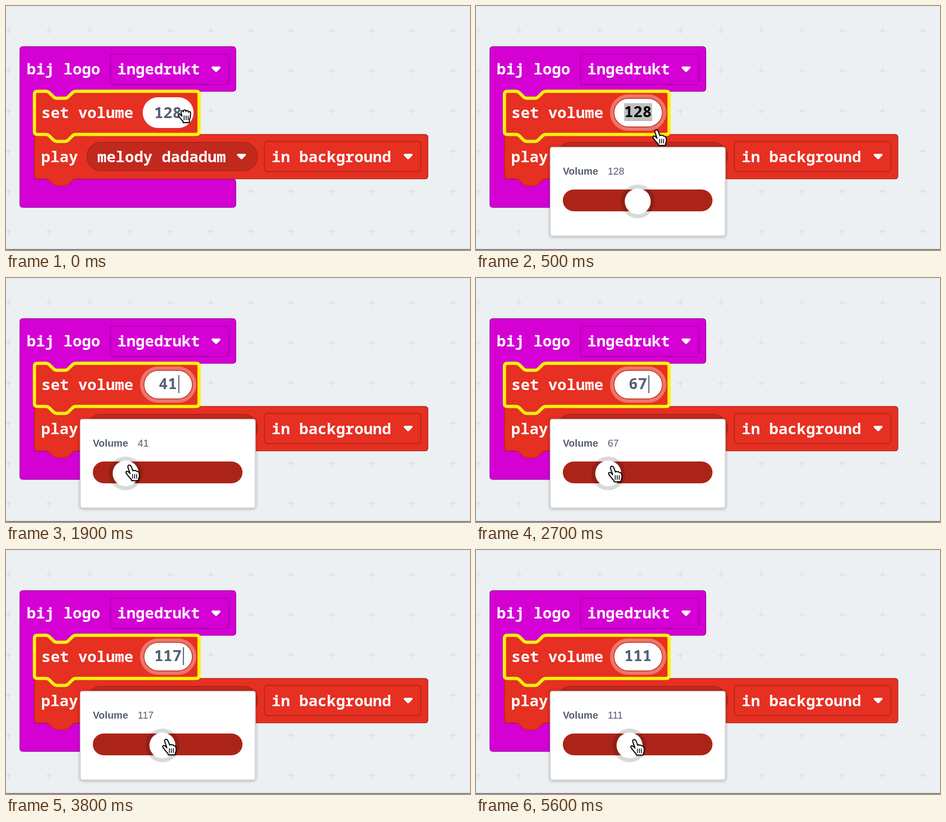
These frames come from a looping animation (930x492 px, 5970 ms). An HTML page:

```html
<!DOCTYPE html>
<html lang="nl">
<head>
<meta charset="utf-8">
<title>Volume slider</title>
<style>
html, body { margin: 0; width: 100%; height: 100%; overflow: hidden; background: #ecf0f2; }
svg { display: block; width: 930px; height: 492px; }
.mono { font: 600 30.7px "Noto Sans Mono", "DejaVu Sans Mono", monospace; fill: #fff; white-space: pre; }
.label { font: 20px "Liberation Sans", Arial, sans-serif; fill: #575e75; }
.title { font-weight: 700; }
.arrow { fill: #fff; stroke: #fff; stroke-width: 4; stroke-linejoin: round; }
.red { fill: #e63022; stroke: #b8261b; stroke-width: 1.7; }
.cursor { stroke: #000; stroke-width: 2; stroke-linejoin: round; stroke-linecap: round; fill: #fff;
  filter: drop-shadow(0 1px 1px rgba(0,0,0,.35)); }
#value { text-anchor: middle; }
#popup { filter: drop-shadow(0 1px 3px rgba(0,0,0,.3)); }
</style>
</head>
<body>
<svg viewBox="0 0 930 492">
  <path id="grid" stroke="#d9dde0" stroke-width="1.6"/>
  <rect y="490" width="930" height="2" fill="#7d7f80"/>

  <path id="event" fill="#d400d4" stroke="#a000a0" stroke-width="1.6"/>
  <rect x="209.500" y="97" width="237" height="61" rx="6" fill="none" stroke="#aa00aa" stroke-width="1.8"/>
  <text class="mono" x="41.500" y="138">bij logo</text>
  <text class="mono" x="223" y="138">ingedrukt</text>

  <path id="play" class="red"/>
  <rect x="162" y="275" width="342" height="57" rx="28.500" fill="#c2291d" stroke="#ae2419" stroke-width="1.8"/>
  <rect x="518" y="273" width="313.500" height="61" rx="6" fill="none" stroke="#b8261b" stroke-width="1.8"/>
  <text class="mono" x="70.500" y="315">play</text>
  <text class="mono" x="183" y="315">melody dadadum</text>
  <text class="mono" x="532.500" y="315">in background</text>
  <g class="arrow">
    <path d="M414 124h14l-7 7Z"/>
    <path d="M465 300h14l-7 7Z"/>
    <path d="M799 300h14l-7 7Z"/>
  </g>

  <path id="set" fill="#e63022" stroke="#fff20a" stroke-width="6.500" stroke-linejoin="round"/>
  <text class="mono" x="71" y="226">set volume</text>
  <rect id="ring" fill="#fff" fill-opacity=".33"/>
  <rect id="pill" fill="#fff" stroke="#b8261b"/>
  <rect id="mark" x="297" y="196" width="56" height="36" fill="#c0c0c0"/>
  <text id="value" class="mono" x="324.500"></text>
  <rect id="caret" y="196" width="2" height="36" fill="#4b5068"/>

  <g id="popup">
    <rect x="149" y="285" width="350.500" height="178.500" rx="4" fill="#fff" stroke="#d8d9dc" stroke-width="2"/>
    <text class="label title" x="174" y="340">Volume</text>
    <text class="label" id="count" x="264" y="340"></text>
    <rect x="174" y="370" width="300" height="44" rx="22" fill="#ac2419"/>
    <g id="knob">
      <circle cy="394" r="34" fill-opacity=".15"/>
      <circle cy="394" r="26" fill="#fff"/>
    </g>
  </g>

  <g id="grab" class="cursor">
    <path d="M12 28.500V26Q8 22 4.500 17.500Q1 14 3 12.500Q5.500 11.500 9.500 15.500L8 8Q7.500 4.500 10 4.500Q12 4.500 12.500 7Q12.500 3 15 3Q17.500 3 17.500 6.500Q18 3.800 20.500 4.200Q22.500 4.500 22.500 8Q23 6 25 6.500Q27 7 26.800 10Q27 17 24.500 23V28.500Z"/>
    <path d="M14 15v8M18 15v8M22 15v8" fill="none" stroke-width="1.6"/>
  </g>
  <g id="beam" fill="none" stroke-linecap="round">
    <path id="beamEdge" stroke="#fff" stroke-width="4"/>
    <path id="beamLine" stroke="#000" stroke-width="2"/>
  </g>
  <g id="point" class="cursor">
    <path d="M13.500 32.500L12.500 29.500Q8 25 4.500 20Q1 15.500 3 14Q6 12.500 10.500 18.500L6.500 6.500Q5 2 8.500 1.200Q11.500 1 13 5L16 13Q17 10.500 20 12.800Q22 11.200 24 14.200Q27.500 13.200 28.500 18Q30 24 27.500 28.500L27 32.500Z"/>
    <path d="M15.500 20v8M19.500 20v8M23.500 20v8" fill="none" stroke-width="1.6"/>
  </g>
</svg>
<script>
const LOOP = 5970, STEP = 100;
const el = id => document.getElementById(id);
const set = (id, attrs) => { for (const k in attrs) el(id).setAttribute(k, attrs[k]); };
const show = (id, on) => set(id, { visibility: on ? 'visible' : 'hidden' });
const move = (id, x, y) => set(id, { transform: `translate(${x} ${y})` });

// Linear interpolation over rows of [time, ...values].
function at(keys, t) {
  const i = keys.findIndex(k => k[0] > t);
  if (i < 0) return keys[keys.length - 1].slice(1);
  if (i === 0) return keys[0].slice(1);
  const a = keys[i - 1], b = keys[i], p = (t - a[0]) / (b[0] - a[0]);
  return a.slice(1).map((v, j) => v + (b[j + 1] - v) * p);
}

// The interlocking edge, drawn rightwards (notch) or leftwards (tab).
const NOTCH = 'H80q4 0 7 3l8 8q3 3 7 3H118q4 0 7-3l8-8q3-3 7-3';
const TAB = 'H140q-4 0-7 3l-8 8q-3 3-7 3H102q-4 0-7-3l-8-8q-3-3-7-3';

function block(l, t, r, b, top = '') {
  return `M${l} ${t + 6}q0-6 6-6${top}H${r - 6}q6 0 6 6V${b - 6}q0 6-6 6${TAB}H${l + 6}q-6 0-6-6Z`;
}

function pill(id, w, h, extra) {
  set(id, { x: 325 - w / 2, y: 215 - h / 2, width: w, height: h, rx: h / 2, ...extra });
}

let grid = '';
for (let x = 5; x < 930; x += 80.95)
  for (let y = 50; y < 480; y += 81) grid += `M${x - 6} ${y}h12M${x} ${y - 6}v12`;
set('grid', { d: grid });
set('event', { d: `M34 82H454q6.500 0 6.500 6.500V165.500q0 6.500-6.500 6.500${TAB}H57V349H454
  q6.500 0 6.500 6.500V399.500q0 6.500-6.500 6.500H34q-6 0-6-6V88q0-6 6-6Z` });
set('play', { d: block(57, 259, 845.5, 348.5) });
set('set', { d: block(57, 172, 387, 259, NOTCH) });
const beam = 'M-6-15Q0-15 0-10Q0-15 6-15M0-10V11M-6 16Q0 16 0 11Q0 16 6 16M-3 3H3';
set('beamEdge', { d: beam });
set('beamLine', { d: beam });

const volume = [[1100, 128], [1300, 114], [1600, 72], [1900, 41], [2100, 34], [2300, 38],
  [2800, 74], [3300, 105], [3800, 117], [4200, 114], [4400, 111]];
const opening = [[100, 0, -20, 0], [200, .7, -14, 1.5], [300, .95, -4, 5], [400, 1, 0, 7.5]];
const approach = [[200, 357, 219], [400, 357, 222], [600, 348, 275], [900, 326, 372], [1100, 322.5, 381]];
const drag = [[1100, 381], [1900, 376], [3300, 380], [4400, 381]];

function draw(t) {
  const editing = t >= 100, dragging = t > 1100;
  const v = Math.round(at(volume, t)[0]), text = String(v);
  const knobX = 200 + v * .97;
  const [alpha, dy, grow] = at(opening, t);

  pill('pill', editing ? 97 : 102, editing ? 57.5 : 62, { 'stroke-width': editing ? 1.5 : 0 });
  pill('ring', 98 + 2 * grow, 58.5 + 2 * grow);
  show('ring', editing);
  show('mark', editing && !dragging);
  show('caret', dragging && t < 5600);
  set('caret', { x: 327 + text.length * 9.2 });

  el('value').textContent = el('count').textContent = text;
  el('value').style.fontWeight = editing ? 800 : 600;
  el('value').style.fill = editing && !dragging ? '#000' : '#575e75';
  set('value', { y: editing ? 224 : 226 });

  set('popup', { opacity: alpha });
  move('popup', 0, dy);
  move('knob', knobX, 0);

  let [x, y] = at(approach, t);
  if (dragging) {
    x = knobX - 1.5 + (t >= 4600 ? 2 : 0);
    y = at(drag, t)[0];
  }
  const inField = y < 246;
  show('grab', !editing);
  show('beam', editing && inField);
  show('point', editing && !inField);
  move('grab', 343, 206.5);
  move('beam', x, y);
  move('point', x, y);
}

const start = performance.now();
function tick() {
  const t = (performance.now() - start) % LOOP;
  draw(Math.floor(t / STEP) * STEP);
  requestAnimationFrame(tick);
}
tick();
</script>
</body>
</html>
```
